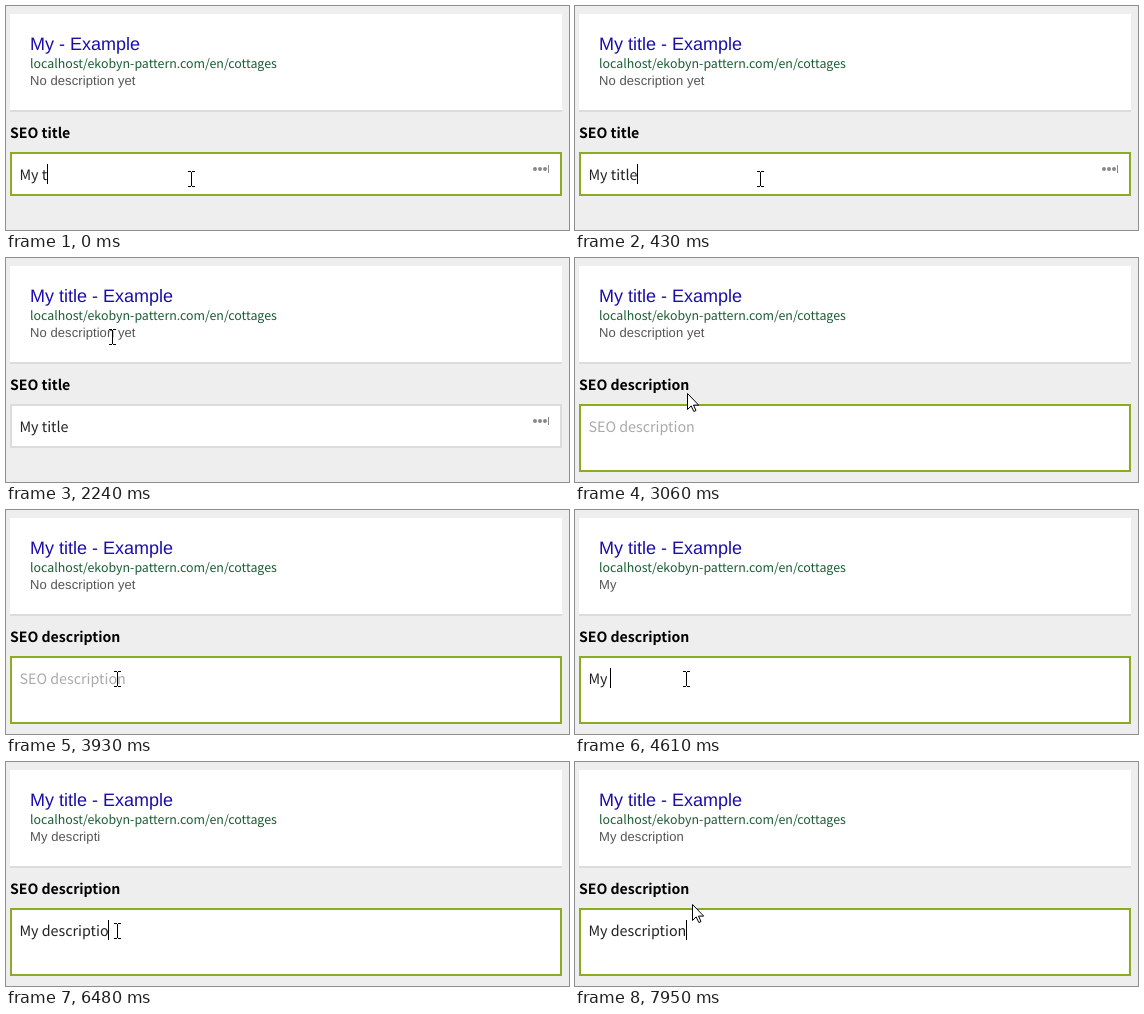
An HTML page for the animation above (8000 ms loop, 563 px wide and 224 px high).

```html
<!DOCTYPE html>
<html lang="en">
<head>
<meta charset="utf-8">
<title>Search snippet editor</title>
<style>
  html, body { margin: 0; width: 100%; height: 100%; overflow: hidden; background: #eee; }
  svg { display: block; width: 563px; height: 224px; }
  text { white-space: pre; text-rendering: geometricPrecision; }
  .arial { font-family: "Liberation Sans", Arial, sans-serif; }
  .humanist { font-family: "Noto Sans CJK JP", "Noto Sans CJK SC", "Noto Sans CJK", "Open Sans", sans-serif; }
  #title { font-size: 18px; fill: #1a0dab; }
  #url { font-size: 12.4px; fill: #1a5c33; }
  #desc { font-size: 13px; fill: #545454; letter-spacing: .08px; }
  #label { font-size: 14.1px; font-weight: 700; fill: #000; }
  #input, #placeholder { font-size: 14.3px; fill: #222; }
  #placeholder { fill: #aaa; }
  #field { fill: #fff; stroke-width: 2; }
  .crisp { shape-rendering: crispEdges; }
</style>
</head>
<body>
<svg viewBox="0 0 563 224">
  <rect class="crisp" x="4" y="8" width="552" height="98" fill="#dcdcdc"/>
  <rect class="crisp" x="4" y="8" width="552" height="96" fill="#fff"/>
  <text id="title" class="arial" x="24" y="44"></text>
  <text id="url" class="humanist" x="24" y="62">localhost/ekobyn-pattern.com/en/cottages</text>
  <text id="desc" class="arial" x="24" y="79"></text>

  <text id="label" class="humanist" x="4" y="132"></text>
  <rect id="field" class="crisp" x="5" y="147" width="550" height="42"/>
  <text id="placeholder" class="humanist" x="13.5" y="174">SEO description</text>
  <text id="input" class="humanist" x="13.5" y="174"></text>
  <rect id="caret" class="crisp" y="158" width="1" height="20" fill="#000"/>
  <g id="icon" fill="#888">
    <circle cx="529" cy="163" r="2"/>
    <circle cx="534" cy="163" r="2"/>
    <circle cx="539" cy="163" r="2"/>
    <rect class="crisp" x="542" y="159" width="1" height="8"/>
  </g>

  <path id="beam" class="crisp" d="M-3-8h3v1h1v-1h3v1h-3v14h3v1h-3v-1h-1v1h-3v-1h3v-14h-3z"/>
  <path id="arrow" d="M.5.5v16l3.7-3.6 2.6 5.6 2.2-1-2.5-5.4h5.2z" fill="#fff" stroke="#000"/>
</svg>
<script>
const LOOP = 8000;
const el = id => document.getElementById(id);
const beam = (x, y) => ({ pointer: "beam", x, y });
const arrow = (x, y) => ({ pointer: "arrow", x, y });

// Each step lists only what changes at that time.
const steps = [
  [0, { label: "SEO title", input: "My t", title: "My", desc: "No description yet",
        focus: true, caret: true, ...beam(185, 173) }],
  [160, { input: "My tit", title: "My t" }],
  [290, { input: "My titl", title: "My tit" }],
  [430, { input: "My title", title: "My title" }],
  [1010, { caret: false }],
  [1440, { caret: true, ...beam(178, 160) }],
  [1570, arrow(150, 118)],
  [1700, arrow(118, 92)],
  [1830, beam(106, 80)],
  [1980, { caret: false, ...beam(106, 79) }],
  [2240, { focus: false }],
  [2360, { label: "SEO description", input: "", focus: true, caret: true }],
  [2810, { caret: false, ...arrow(108, 92) }],
  [2940, arrow(111, 118)],
  [3060, arrow(112, 135)],
  [3210, beam(113, 161)],
  [3370, { caret: true, ...beam(111, 169) }],
  [3930, { caret: false }],
  [4200, { input: "M", caret: true }],
  [4340, { input: "My", desc: "M" }],
  [4460, { desc: "My" }],
  [4610, { input: "My " }],
  [5140, { input: "My d" }],
  [5280, { input: "My de", desc: "My de" }],
  [5540, { input: "My des", desc: "My des" }],
  [5660, { input: "My desc", desc: "My desc" }],
  [5800, { input: "My descr", desc: "My descr" }],
  [5920, { input: "My descri", desc: "My descri" }],
  [6190, { input: "My descrip" }],
  [6340, { input: "My descript", desc: "My descript" }],
  [6480, { input: "My descriptio", desc: "My descripti" }],
  [6600, { input: "My description", desc: "My descriptio" }],
  [6740, { desc: "My description" }],
  [7290, { caret: false }],
  [7820, { caret: true, ...beam(114, 155) }],
  [7950, arrow(117, 142)],
];

const stateAt = time =>
  Object.assign({}, ...steps.filter(([start]) => start <= time).map(([, change]) => change));

const show = (id, visible) => el(id).setAttribute("visibility", visible ? "visible" : "hidden");

function draw(time) {
  const s = stateAt(time);
  const long = s.label === "SEO description";
  el("title").textContent = s.title + " - Example";
  el("desc").textContent = s.desc;
  el("label").textContent = s.label;
  el("input").textContent = s.input;

  el("field").setAttribute("height", long ? 66 : 42);
  el("field").setAttribute("stroke", s.focus ? "#8aab23" : "#dcdcdc");
  show("icon", !long);
  show("placeholder", !s.input);

  const end = s.input ? 13.5 + el("input").getComputedTextLength() : 14;
  el("caret").setAttribute("x", Math.floor(end));
  show("caret", s.caret);

  for (const kind of ["beam", "arrow"]) show(kind, s.pointer === kind);
  el(s.pointer).setAttribute("transform", `translate(${s.x} ${s.y})`);
}

function tick() {
  draw(performance.now() % LOOP);
  requestAnimationFrame(tick);
}
tick();
</script>
</body>
</html>
```
